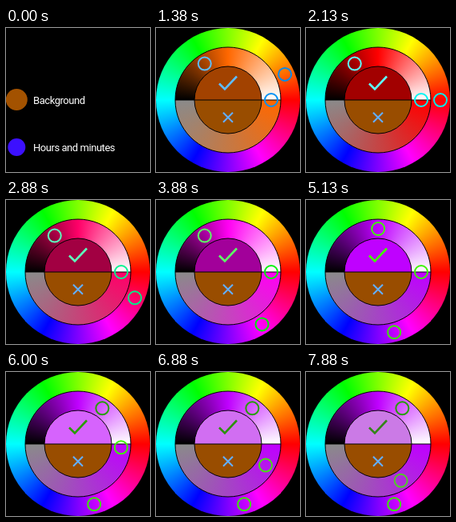
Write an HTML page that moves like this. It is 180x180 px and loops after 8 s.

```html
<!DOCTYPE html>
<html lang="en">
<head>
<meta charset="utf-8">
<title>Colour picker</title>
<style>
  html, body { margin: 0; width: 100%; height: 100%; overflow: hidden; background: #000; }
  #stage { position: relative; width: 180px; height: 180px; overflow: hidden; }
  #stage svg { position: absolute; left: 0; top: 0; display: block; }
  #wheel, #tones { position: absolute; border-radius: 50%; }
  #wheel {
    inset: 0;
    background: conic-gradient(from 90deg, #f00, #f0f, #00f, #0ff, #0f0, #ff0, #f00);
  }
  #tones { inset: 24px; }
  text { font: 13px Roboto, "Open Sans", sans-serif; letter-spacing: -.45px; fill: #fff; }
</style>
</head>
<body>
<div id="stage">
  <svg id="menu" width="180" height="180" viewBox="0 0 180 180">
    <circle cx="13.3" cy="89.5" r="13.5" fill="hsl(30 100% 32%)"/>
    <text x="34" y="95">Background</text>
    <circle cx="13.3" cy="149" r="11" fill="#3c10ff"/>
    <text x="34" y="154">Hours and minutes</text>
  </svg>
  <div id="picker">
    <div id="wheel"></div>
    <div id="tones"></div>
    <svg width="180" height="180" viewBox="0 0 180 180" fill="none">
      <path id="chosen" d="M48 90a42 42 0 0 1 84 0z"/>
      <path d="M48 90a42 42 0 0 0 84 0z" fill="hsl(30 100% 30%)"/>
      <g stroke="#000">
        <circle cx="90" cy="90" r="66"/>
        <circle cx="90" cy="90" r="42"/>
        <path d="M24 90H156"/>
      </g>
      <path id="accept" d="M79 69.5l7 7l15-16" stroke-width="2.6"/>
      <path d="M84 105.7l12 12m0-12l-12 12" stroke="hsl(210 100% 69%)" stroke-width="2"/>
      <g stroke-width="2">
        <circle id="hueMark" r="8"/>
        <circle id="lightMark" r="8"/>
        <circle id="satMark" r="8"/>
      </g>
    </svg>
  </div>
</div>
<script>
const LOOP = 8000, STEP = 125, OPEN = 125;
const $ = id => document.getElementById(id);

// Keys are [time, value] pairs joined by straight lines.
const HUE = [[OPEN, 30], [1375, 24.3], [4430, -75]];
const LIGHT = [[4430, .318], [5840, .69]];
const SAT = [[5840, 1], [7875, .678]];

function valueAt(keys, t) {
  if (t <= keys[0][0]) return keys[0][1];
  for (let i = 1; i < keys.length; i++) {
    const [t0, v0] = keys[i - 1], [t1, v1] = keys[i];
    if (t < t1) return v0 + (v1 - v0) * (t - t0) / (t1 - t0);
  }
  return keys[keys.length - 1][1];
}

const hsl = (h, s, l) => `hsl(${(h + 720) % 360} ${s * 100}% ${l * 100}%)`;

// Angles run clockwise from the right, in degrees.
function placeMark(id, radius, angle, color) {
  const a = angle * Math.PI / 180, mark = $(id);
  mark.setAttribute("cx", 90 + radius * Math.cos(a));
  mark.setAttribute("cy", 90 + radius * Math.sin(a));
  mark.setAttribute("stroke", color);
}

function draw(t) {
  const open = t >= OPEN;
  $("menu").style.display = open ? "none" : "block";
  $("picker").style.display = open ? "block" : "none";
  if (!open) return;

  const hue = valueAt(HUE, t), light = valueAt(LIGHT, t), sat = valueAt(SAT, t);
  const pure = hsl(hue, 1, .5), opposite = hue + 180;
  $("tones").style.background =
    `conic-gradient(from 270deg, #000, ${pure} 90deg, #fff 180deg, ${pure} 180deg, #8a8a8a 360deg)`;
  $("chosen").setAttribute("fill", hsl(hue, sat, light));
  $("accept").setAttribute("stroke", hsl(opposite, sat, 1 - light));
  placeMark("hueMark", 78, -hue, hsl(opposite, 1, .46));
  placeMark("lightMark", 54, 180 + 180 * light, hsl(opposite, 1, 1 - light));
  placeMark("satMark", 54, 180 * (1 - sat), hsl(opposite, sat, .48));
}

const start = performance.now();
function tick() {
  const t = (performance.now() - start) % LOOP;
  draw(Math.floor(t / STEP) * STEP);
  requestAnimationFrame(tick);
}
tick();
</script>
</body>
</html>
```
